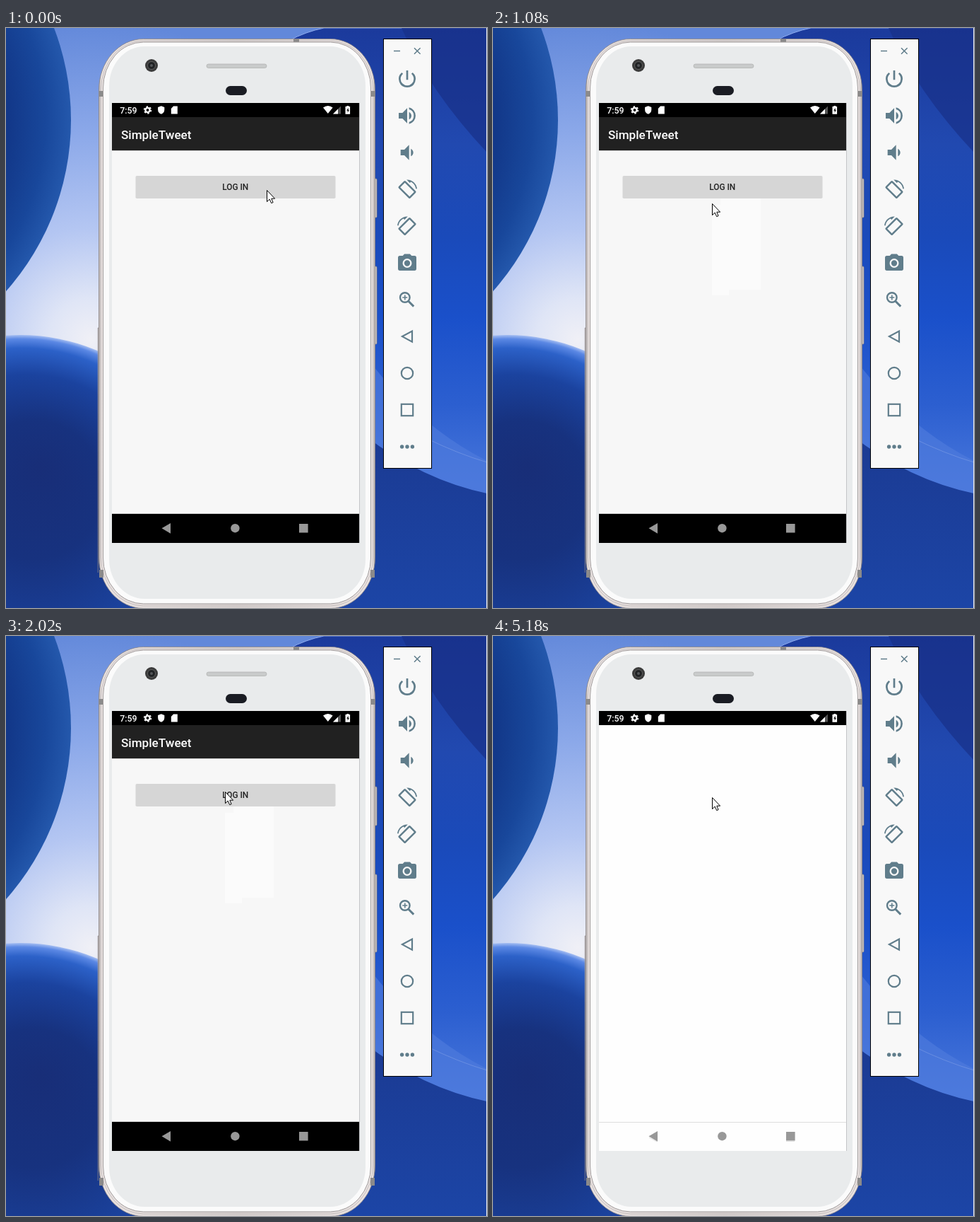
An HTML page that plays this animation: 681x820 px, repeating every 8000 ms.

```html
<!DOCTYPE html>
<html lang="en">
<head>
<meta charset="utf-8">
<title>Phone emulator login</title>
<style>
html, body { margin: 0; width: 100%; height: 100%; overflow: hidden; background: #1c3f9f; }
svg { display: block; width: 681px; height: 820px; }
text { font-family: Roboto, "Open Sans", sans-serif; font-weight: 500; }
.line { fill: none; stroke: #607d8b; }
</style>
</head>
<body>
<svg viewBox="0 0 681 820">
  <defs>
    <radialGradient id="sky" gradientUnits="userSpaceOnUse" cx="120" cy="440" r="450">
      <stop offset="0" stop-color="#f0f0f6"/><stop offset=".13" stop-color="#dfe5f6"/>
      <stop offset=".35" stop-color="#b4c6f2"/><stop offset=".65" stop-color="#8ba8e9"/>
      <stop offset="1" stop-color="#6288da"/>
    </radialGradient>
    <radialGradient id="ballTop" gradientUnits="userSpaceOnUse" cx="-273" cy="130" r="365">
      <stop offset=".75" stop-color="#123788"/><stop offset=".9" stop-color="#18479b"/>
      <stop offset="1" stop-color="#2458ac"/>
    </radialGradient>
    <radialGradient id="ballLow" gradientUnits="userSpaceOnUse" cx="20" cy="714" r="280" fx="50" fy="620">
      <stop offset="0" stop-color="#182e78"/><stop offset=".35" stop-color="#17327f"/>
      <stop offset=".7" stop-color="#1b439f"/><stop offset=".9" stop-color="#2c61c8"/>
      <stop offset=".97" stop-color="#5b88e4"/><stop offset="1" stop-color="#a4bdf2"/>
    </radialGradient>
    <linearGradient id="ballRight" x2="0" y2="1">
      <stop offset="0" stop-color="#1b3a9c"/><stop offset=".2" stop-color="#2149b0"/>
      <stop offset=".36" stop-color="#1a4aba"/><stop offset=".5" stop-color="#1a50ca"/>
      <stop offset=".65" stop-color="#2c5fd0"/><stop offset=".8" stop-color="#4a78dc"/>
    </linearGradient>
    <linearGradient id="navy" x2="0" y2="1">
      <stop offset="0" stop-color="#1b3a92"/><stop offset="1" stop-color="#1c45a6"/>
    </linearGradient>
    <linearGradient id="metal">
      <stop offset="0" stop-color="#a9a2a2"/><stop offset=".008" stop-color="#eae3e2"/>
      <stop offset=".5" stop-color="#d6cfce"/><stop offset=".992" stop-color="#eae3e2"/>
      <stop offset="1" stop-color="#a9a2a2"/>
    </linearGradient>
  </defs>

  <!-- wallpaper -->
  <rect width="681" height="820" fill="url(#sky)"/>
  <circle cx="-273" cy="130" r="365" fill="url(#ballTop)"/>
  <path d="M400 18Q425 5 450 0H681V820H400z" fill="url(#ballRight)" stroke="#8fabee"/>
  <path d="M560 0Q600 90 681 176V0z" fill="#172f86" opacity=".65"/>
  <path d="M520 478Q590 566 681 612V660H520z" fill="#4f7cde" opacity=".65"/>
  <path d="M595 580Q640 602 681 614" fill="none" stroke="#7d9de6" opacity=".6"/>
  <path d="M300 570H500Q585 638 681 658V820H300z" fill="url(#navy)"/>
  <path d="M0 700H320V820H0z" fill="#1a3c9a"/>
  <circle cx="20" cy="714" r="280" fill="url(#ballLow)"/>
  <path d="M680.5 0V820" stroke="#e9ebf2"/>

  <!-- phone -->
  <g fill="#cfc8c7" stroke="#8d8786" stroke-width=".8">
    <rect x="520" y="213" width="5" height="55" rx="1.5"/>
    <rect x="520" y="337" width="5" height="110" rx="1.5"/>
    <path d="M131 424h-.8V770"/>
    <rect x="131.5" y="15.5" width="391" height="805" rx="63" ry="72" fill="url(#metal)"/>
    <rect x="134.5" y="18" width="385" height="799" rx="60" ry="69" fill="none" stroke="#bdb6b5"/>
  </g>
  <path d="M132 89h6v8h-6zM516 89h6v8h-6zM407 16h8v4h-8zM132 766h6v11h-6zM516 766h6v11h-6z" fill="#8b8a8a"/>
  <rect x="137.5" y="20" width="379" height="794" rx="57" ry="65" fill="#fbfbfb" stroke="#a09b9b"/>
  <rect x="146" y="26" width="363" height="781" rx="50" ry="56" fill="#e9ebec"/>
  <rect x="284" y="51" width="85" height="5.5" rx="2.7" fill="#c9cbcb" stroke="#acaead" stroke-width=".7"/>
  <circle cx="206" cy="53" r="9" fill="#3b3b3b"/>
  <circle cx="206" cy="53" r="5.5" fill="#202224" stroke="#606060"/>
  <circle cx="206" cy="53" r="2" fill="#55585b"/>
  <rect x="311" y="82" width="30" height="13" rx="6.5" fill="#1a1c23"/>

  <!-- login screen -->
  <rect x="150" y="106" width="350" height="622" fill="#f7f7f7"/>
  <path id="trailWide" d="M322 241H379V370H322z" fill="#fbfbfb"/>
  <path id="trailTall" d="M310 250H322V370H334V378H310z" fill="#fbfbfb"/>
  <rect x="150" y="126" width="350" height="47" fill="#212121"/>
  <rect x="150" y="173" width="350" height="1" fill="#cfcfcf"/>
  <text x="163" y="156.5" font-size="17.1" fill="#fff">SimpleTweet</text>
  <rect x="183.5" y="209" width="283" height="32" rx="1.8" fill="#d6d6d6"/>
  <text x="324.7" y="229.3" font-size="11.9" fill="#222" text-anchor="middle">LOG IN</text>
  <rect x="150" y="687" width="350" height="41"/>
  <path d="M150 686.5H500" stroke="#d2d2d2"/>

  <!-- blank page -->
  <g id="page">
    <rect x="150" y="126" width="350" height="602" fill="#fefefe"/>
    <path d="M150 687.5H500" stroke="#dedede"/>
    <path d="M221 709L232 715M415 714.5H427" stroke="#e2e2e2"/>
  </g>
  <g id="nav" fill="#989898">
    <path d="M220.5 707.3L233 700V714.7zM415 701h12.6v12.6h-12.6z"/>
    <circle cx="324.4" cy="707.2" r="6.2"/>
  </g>
  <path d="M500.5 106V728" stroke="#c4c5c8"/>

  <!-- status bar -->
  <rect x="150" y="106" width="350" height="20"/>
  <g fill="#fff">
    <text x="161.3" y="120.6" font-size="12.3">7:59</text>
    <circle cx="200.5" cy="116" r="3.1" fill="none" stroke="#fff" stroke-width="2.4"/>
    <circle cx="200.5" cy="116" r="4.9" fill="none" stroke="#fff" stroke-width="1.6" stroke-dasharray="2.5 2.63"/>
    <path d="M219.7 110.2l4.6 1.9v3.4q0 4.4-4.6 6.3q-4.6-1.9-4.6-6.3v-3.4z"/>
    <path d="M237 110.5h5.8v11h-9v-7.6z"/>
    <path d="M449 112.6q6.8-5.2 13.6 0L455.8 121z"/>
    <path d="M474 110.5v11h-11z" fill="#555"/>
    <path d="M470 114.5v7h-7z"/>
    <path d="M482.3 110h3v1.1h1.8v10.6h-6.6v-10.6h1.8z"/>
  </g>
  <path d="M484.6 112.8l-2.3 4h1.4v3l2.2-4h-1.3z"/>

  <!-- emulator toolbar -->
  <rect x="534.5" y="15.5" width="68" height="607" fill="#f8f8f8" stroke="#000"/>
  <path class="line" stroke-width="1.5" d="M549 32.5h9M578 28.2l8.6 8.6m0-8.6l-8.6 8.6"/>
  <g id="icons" fill="#607d8b"></g>
  <g class="line" stroke-width="2.2">
    <path d="M575 428.6V443.6L561 436.1z"/>
    <circle cx="568" cy="488" r="8.2"/>
    <rect x="559.8" y="531.8" width="16.4" height="16.4"/>
    <circle cx="564.8" cy="381" r="6.8" stroke-width="2.4"/>
    <path stroke-width="3" d="M569.6 386l7.6 7.6"/>
    <path stroke-width="1.6" d="M561.3 381h7m-3.5-3.5v7"/>
  </g>
  <g fill="#607d8b">
    <circle cx="560.6" cy="592" r="2.7"/><circle cx="568" cy="592" r="2.7"/><circle cx="575.4" cy="592" r="2.7"/>
  </g>

  <path id="cursor" d="M.5 .5V16.6L4.2 13.1L6.7 18.6L9.1 17.6L6.8 12.2H11.6z" fill="#fff" stroke="#000"/>
</svg>
<script>
const LOOP = 8000;
const $ = id => document.getElementById(id);

const turn = "M10.23 1.75a1.5 1.5 0 0 0-2.12 0L1.75 8.11a1.5 1.5 0 0 0 0 2.12l12.02 12.02a1.5 1.5 0 0 0 2.12 0l6.36-6.36a1.5 1.5 0 0 0 0-2.12zM14.83 20.4L3.6 9.17 9.17 3.6 20.4 14.83zM16.48 2.52c3.27 1.55 5.61 4.72 5.97 8.48h1.5C23.44 4.84 18.29 0 12 0l-.66.03 3.81 3.81z";

// Each icon sits on a 24-unit grid: centre y, scale x, scale y, outline
const icons = [
  [72, 1.33, 1.33, "M13 3h-2v10h2zm4.83 2.17l-1.42 1.42C17.99 7.86 19 9.81 19 12a7 7 0 0 1-14 0c0-2.19 1.01-4.14 2.58-5.42L6.17 5.17A9 9 0 0 0 12 21a9 9 0 0 0 5.83-15.83z"],
  [124, 1.33, 1.33, "M3 9v6h4l5 5V4L7 9zm13.5 3c0-1.77-1.02-3.29-2.5-4.03v8.05c1.48-.73 2.5-2.25 2.5-4.02zM14 3.23v2.06a7 7 0 0 1 0 13.42v2.06a9 9 0 0 0 0-17.54z"],
  [176, 1.33, 1.33, "M18.5 12c0-1.77-1.02-3.29-2.5-4.03v8.05c1.48-.73 2.5-2.25 2.5-4.02zM5 9v6h4l5 5V4L9 9z"],
  [228.5, 1.17, 1.17, turn],
  [280.5, -1.17, 1.17, turn],
  [332.5, 1.3, 1.3, "M9 2L7.17 4H4a2 2 0 0 0-2 2v12a2 2 0 0 0 2 2h16a2 2 0 0 0 2-2V6a2 2 0 0 0-2-2h-3.17L15 2zM12 17a5 5 0 1 1 0-10 5 5 0 0 1 0 10zM12 8.8a3.2 3.2 0 1 0 0 6.4 3.2 3.2 0 0 0 0-6.4z"]
];
$("icons").innerHTML = icons.map(([y, sx, sy, d]) =>
  `<path fill-rule="evenodd" transform="translate(568 ${y}) scale(${sx} ${sy}) translate(-12 -12)" d="${d}"/>`).join("");

// Hold each value until the next time in the table
function hold(id, property, table) {
  const frames = table.map(([time, value]) =>
    ({ offset: time / LOOP, [property]: value, easing: "steps(1, end)" }));
  frames.push({ offset: 1, [property]: table.at(-1)[1] });
  $(id).animate(frames, { duration: LOOP, iterations: Infinity });
}

const path = [
  [0, 369, 229], [500, 346, 290], [630, 322, 351], [780, 317, 359],
  [930, 310, 269], [1080, 310, 248], [1350, 310, 246], [1470, 310, 241],
  [1590, 310, 234], [1710, 310, 228], [1870, 310, 221], [2020, 310, 220],
  [2420, 310, 224], [2560, 310, 228]
];
hold("cursor", "transform", path.map(([t, x, y]) => [t, `translate(${x}px, ${y}px)`]));
hold("trailWide", "opacity", [[0, 0], [500, 1]]);
hold("trailTall", "opacity", [[0, 0], [930, 1]]);
hold("page", "opacity", [[0, 0], [5060, 1]]);
hold("nav", "opacity", [[0, 1], [5060, 0], [5180, 1]]);
</script>
</body>
</html>
```
